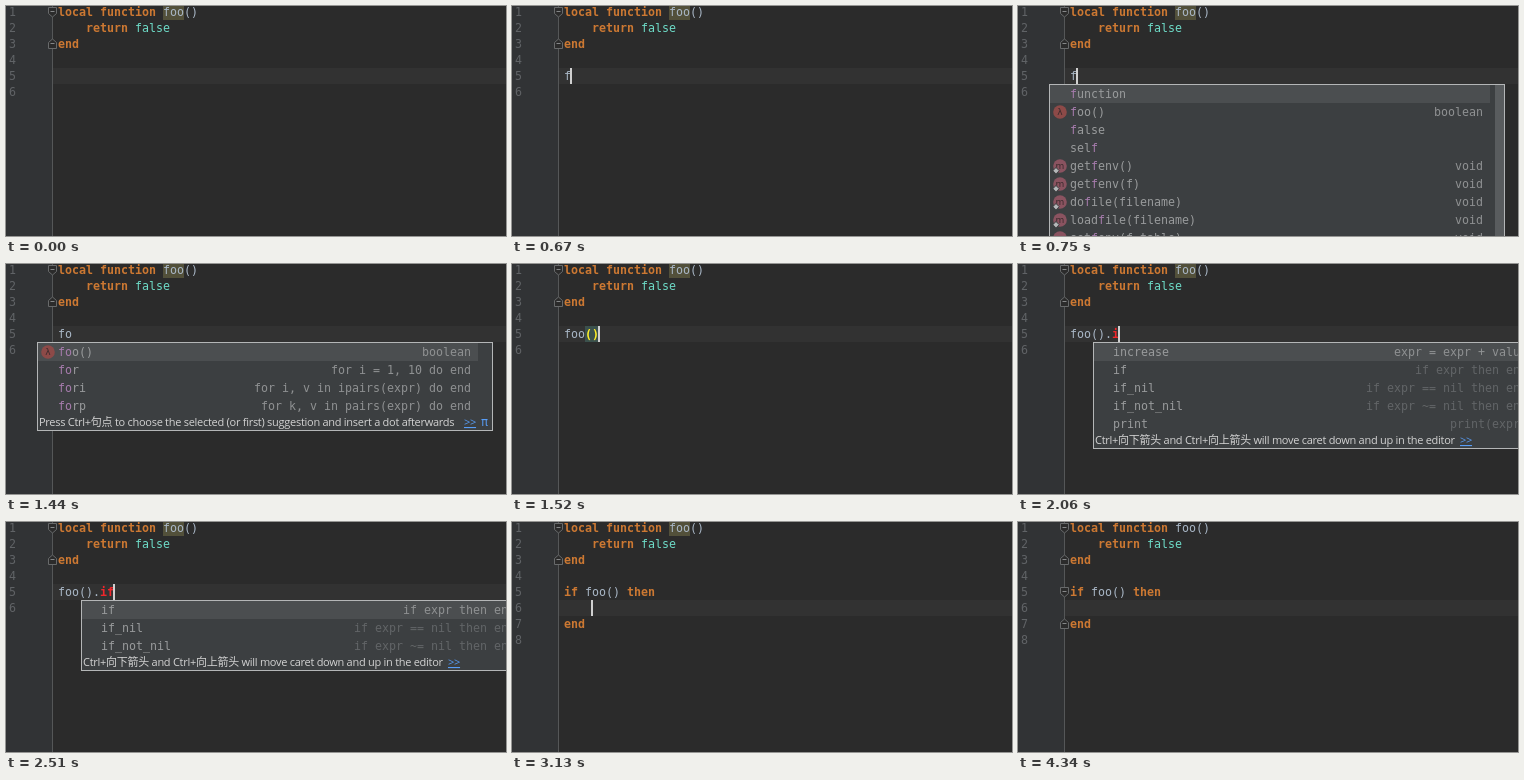
An HTML page for the animation above (4.5 s loop, 500x230 px).

```html
<!DOCTYPE html>
<html lang="en">
<head>
<meta charset="utf-8">
<title>Postfix completion in a Lua editor</title>
<style>
  html, body { margin: 0; width: 100%; height: 100%; overflow: hidden; background: #2b2b2b; }
  svg { display: block; width: 500px; height: 230px; }
  text { font: 11.63px "DejaVu Sans Mono", monospace; fill: #a9b7c6; white-space: pre; }
  .kw { fill: #cc7832; font-weight: bold; }
  .bool { fill: #6edcc8; }
  .bad { fill: #f0262b; font-weight: bold; }
  .brace { fill: #ffef28; font-weight: bold; }
  .num { fill: #606366; }
  .item { fill: #999b9c; }
  .hit { fill: #a77cad; }
  .type { fill: #8f9192; }
  .dim { fill: #626567; }
  .hint { font: 11px "Open Sans", "Noto Sans", "Noto Sans CJK SC", sans-serif; letter-spacing: -.27px; fill: #d2d2d2; }
  .link { fill: #589df6; }
  .more { text-decoration: underline; }
  .icon { font: 9px "DejaVu Sans", sans-serif; fill: #3a2a2c; text-anchor: middle; }
</style>
</head>
<body>
<svg id="stage" viewBox="0 0 500 230"></svg>
<script>
const LOOP = 4500, COL = 7, LEFT = 52, LINE = 16, ROW = 18;
const stage = document.getElementById('stage');

const rect = (x, y, w, h, fill, extra = '') =>
  `<rect x="${x}" y="${y}" width="${w}" height="${h}" fill="${fill}" ${extra}/>`;
const esc = s => s.replace(/&/g, '&amp;').replace(/</g, '&lt;').replace(/>/g, '&gt;');
const text = (x, y, s, cls = '') => `<text x="${x}" y="${y}" class="${cls}">${esc(s)}</text>`;
const lineTop = line => LINE * (line - 1) - 2;

// Code is written as [column, string, class] parts on one line.
const code = (line, ...parts) =>
  parts.map(([col, s, cls]) => text(LEFT + COL * col, lineTop(line) + 12, s, cls)).join('');

const caretAt = (line, col) => rect(Math.max(LEFT, LEFT - 1 + COL * col), lineTop(line), 2, LINE, '#d0d0d0');

// Fold handle: a pentagon pointing down (dir 1) or up (dir -1).
function fold(line, dir) {
  const y = lineTop(line) + 8, p = v => y + dir * v;
  return `<path d="M42.5 ${p(-4.5)}H50.5V${p(1.5)}L46.5 ${p(5)}L42.5 ${p(1.5)}Z" fill="#2b2b2b" stroke="#686a6b"/>` +
    `<path d="M44.5 ${y - .5}H48.5" stroke="#858788"/>`;
}

function icon(kind, x, y) {
  if (kind === 'pen')
    return `<path d="M${x - 4} ${y + 5}l1-4 6-6 3 3-6 6z" fill="#62a352"/>` +
      `<path d="M${x - 4} ${y + 5}l1-4 3 3z" fill="#c9b48c"/>`;
  const lambda = kind === 'fn';
  return `<circle cx="${x}" cy="${y}" r="6.8" fill="${lambda ? '#8d4a48' : '#8a5360'}"/>` +
    text(x, y + 3, lambda ? 'λ' : 'm', 'icon') +
    (lambda ? '' : `<path d="M${x - 4} ${y + 1.5}l3.2 3.2-3.2 3.2-3.2-3.2z" fill="#b4b6b8" stroke="#3c3f41"/>`);
}

function label(x, y, s, query) {
  const at = query ? s.indexOf(query) : -1;
  if (at < 0) return text(x, y, s, 'item');
  const end = at + query.length;
  return text(x, y, s.slice(0, at), 'item') + text(x + COL * at, y, query, 'hit') +
    text(x + COL * end, y, s.slice(end), 'item');
}

function popup({ x, right, typeEnd, rows, query, tail = 'type', hint, more, pi, scroll, bar }) {
  const h = rows.length * ROW + (hint ? 15 : 30);
  let out = rect(x + .5, 78.5, right - x - 1, h + 1, '#3c3f41', 'stroke="#b4b6b7"') +
    rect(x + 1, 79, bar - x - 1, ROW, '#4b4e50');
  rows.forEach(([name, type = '', kind], i) => {
    const mid = 88 + ROW * i, base = mid + 4;
    if (kind) out += icon(kind, x + (kind === 'pen' ? 10 : 11), mid);
    out += label(x + (tail === 'dim' ? 20 : 21), base, name, query) +
      text(typeEnd - COL * type.length, base, type, i ? tail : 'type');
  });
  if (scroll) out += rect(477, 79, 9, 160, '#595c5e');
  if (hint) {
    const y = 79 + rows.length * ROW + 11;
    out += text(x + 2, y, hint, 'hint') + text(more, y, '>>', 'hint link more');
    if (pi) out += text(pi, y, 'π', 'link');
  }
  return out;
}

const names = { x: 31, right: 487, typeEnd: 465 };
const postfix = { x: 75, right: 520, typeEnd: 509, bar: 519, tail: 'dim' };
const arrowHint = { hint: 'Ctrl+向下箭头 and Ctrl+向上箭头 will move caret down and up in the editor', more: 442 };

const increase = ['increase', 'expr = expr + value'];
const printCall = ['print', 'print(expr)'];
const ifs = [
  ['if', 'if expr then end'],
  ['if_nil', 'if expr == nil then end'],
  ['if_not_nil', 'if expr ~= nil then end']
];

const listF = popup({
  ...names, query: 'f', scroll: true, bar: 472,
  rows: [
    ['function'], ['foo()', 'boolean', 'fn'], ['false'], ['self'],
    ...['getfenv()', 'getfenv(f)', 'dofile(filename)', 'loadfile(filename)', 'setfenv(f,table)']
      .map(s => [s, 'void', 'method'])
  ]
});
const listFo = popup({
  ...names, query: 'fo', bar: 472, more: 458, pi: 475,
  hint: 'Press Ctrl+句点 to choose the selected (or first) suggestion and insert a dot afterwards',
  rows: [
    ['foo()', 'boolean', 'fn'],
    ['for', 'for i = 1, 10 do end'],
    ['fori', 'for i, v in ipairs(expr) do end'],
    ['forp', 'for k, v in pairs(expr) do end']
  ]
});
const listDot = popup({
  ...postfix,
  rows: [
    ['foo', '', 'pen'], increase, ['decrease', 'expr = expr - value'],
    ['var', 'local inst = expr'], printCall,
    ['for_p', 'for i, v in pairs(expr) do end'], ['for', 'for i = 1, expr do end'],
    ['return', 'return expr'], ifs[0]
  ]
});
const listI = popup({ ...postfix, ...arrowHint, rows: [increase, ...ifs, printCall] });
const listIf = popup({ ...postfix, ...arrowHint, rows: ifs });

function scene({ row = 5, lines = 6, body = '', caret = -1, list = '', used = false, folds = '' }) {
  let out = rect(0, 0, 500, 230, '#2b2b2b') + rect(0, 0, 46, 230, '#313335') +
    rect(47, lineTop(row), 453, LINE, '#323232') + rect(46, 0, 1, 230, '#555758');
  for (let n = 1; n <= lines; n++) out += text(3, lineTop(n) + 12, String(n), 'num');
  if (!used) out += rect(157, -2, 21, LINE, '#52503a');
  out += fold(1, 1) + fold(3, -1) + folds +
    code(1, [0, 'local function', 'kw'], [15, 'foo()']) +
    code(2, [4, 'return', 'kw'], [11, 'false', 'bool']) +
    code(3, [0, 'end', 'kw']) + body;
  if (caret >= 0) out += caretAt(row, caret);
  return out + list;
}

const typed = (...parts) => code(5, ...parts);
const braces = rect(73, 62, 14, LINE, '#3b514d') + typed([0, 'foo'], [3, '()', 'brace']);
const block = {
  row: 6, lines: 8,
  body: typed([0, 'if', 'kw'], [3, 'foo()'], [9, 'then', 'kw']) + code(7, [0, 'end', 'kw'])
};
const checked = { ...block, used: true, folds: fold(5, 1) + fold(7, -1) };

const steps = [
  [0, {}],
  [440, { caret: 0 }],
  [670, { body: typed([0, 'f']), caret: 1 }],
  [750, { body: typed([0, 'f']), caret: 1, list: listF }],
  [830, { body: typed([0, 'fo']), caret: 2, list: listFo }],
  [1440, { body: typed([0, 'fo']), list: listFo }],
  [1520, { body: braces, caret: 5 }],
  [1750, { body: typed([0, 'foo().']), caret: 6, list: listDot }],
  [1980, { body: typed([0, 'foo().i']), caret: 7, list: listDot }],
  [2060, { body: typed([0, 'foo().'], [6, 'i', 'bad']), caret: 7, list: listI }],
  [2510, { body: typed([0, 'foo().'], [6, 'if', 'bad']), caret: 8, list: listIf }],
  [3130, { ...block, caret: 4 }],
  [3420, { ...checked, caret: 4 }],
  [4340, checked]
];

const start = performance.now();
let shown = -1;
function draw() {
  const t = (performance.now() - start) % LOOP;
  const i = steps.findLastIndex(([at]) => at <= t);
  if (i !== shown) {
    stage.innerHTML = scene(steps[i][1]);
    shown = i;
  }
  requestAnimationFrame(draw);
}
draw();
</script>
</body>
</html>
```
